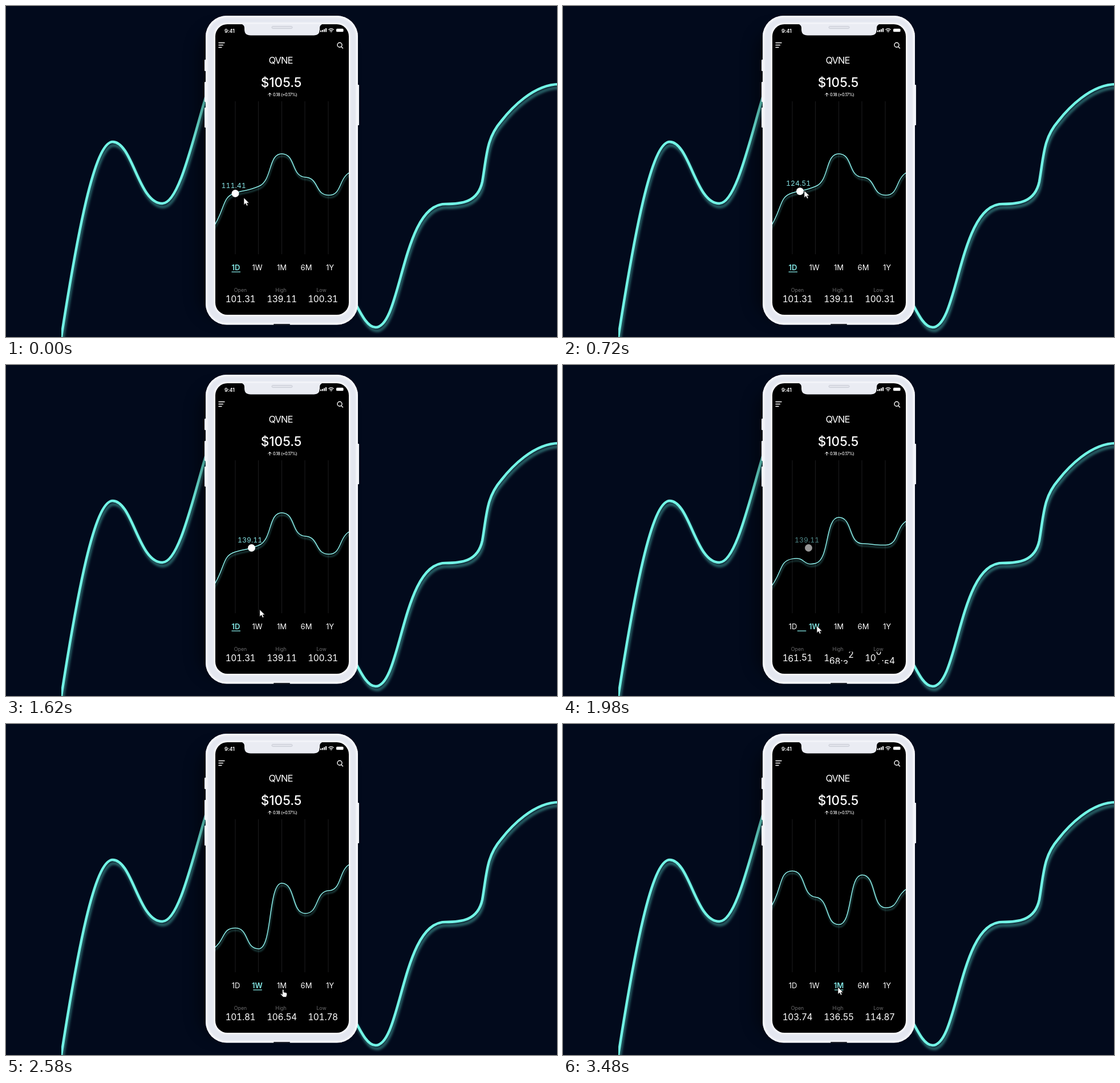
Write an HTML page that moves like this. It is 966x580 px and loops after 3540 ms.

```html
<!DOCTYPE html>
<html lang="en">
<head>
<meta charset="utf-8">
<title>Stock chart</title>
<style>
  html, body { margin: 0; width: 100%; height: 100%; overflow: hidden; background: #020a1c; }
  svg { display: block; width: 966px; height: 580px; font-family: Inter, "Liberation Sans", sans-serif; }
  .mid { text-anchor: middle; }
  .digits { font-feature-settings: "tnum"; }
  .line { fill: none; stroke-linecap: round; stroke-linejoin: round; }
</style>
</head>
<body>
<svg viewBox="0 0 966 580" fill="#fff">
  <defs>
    <filter id="glow" x="-10%" y="-10%" width="120%" height="130%">
      <feDropShadow dx="2" dy="6" stdDeviation="2.2" flood-color="#5fe0d4" flood-opacity=".5"/>
    </filter>
    <filter id="softGlow" x="-10%" y="-20%" width="120%" height="150%">
      <feDropShadow dx="1" dy="4" stdDeviation="1.5" flood-color="#5fd8d8" flood-opacity=".5"/>
    </filter>
    <filter id="blur" x="-30%" y="-20%" width="160%" height="140%"><feGaussianBlur stdDeviation="14"/></filter>
    <filter id="bevel"><feGaussianBlur stdDeviation="1"/></filter>
    <clipPath id="shell"><rect x="350" y="17" width="267" height="541.5" rx="37"/></clipPath>
    <clipPath id="screen"><rect x="367" y="32" width="234" height="509" rx="21"/></clipPath>
    <clipPath id="reels"><rect x="367" y="502.5" width="234" height="21"/></clipPath>
    <clipPath id="stage"><rect x="97" width="869" height="580"/></clipPath>
  </defs>

  <rect width="966" height="580" fill="#020a1c"/>
  <g clip-path="url(#stage)">
    <path class="line" filter="url(#glow)" stroke="#72f5e6" stroke-width="4.5" d="M96 586L97 580C125 400 155 238 187 238
      C222 238 232 346 274 346C302 346 325 245 350 160L380 60M600 490L612 520C625 545 635 563 648 563
      C693 563 694 347 770 347C797 347 827 345 835 308C843 262 842 232 868 202C885 180 925 137 970 137"/>
  </g>
  <rect x="340" y="42" width="254" height="504" rx="36" opacity=".5" fill="#000" filter="url(#blur)"/>

  <g fill="#eef0f5">
    <rect x="348" y="94" width="4" height="20" rx="1"/>
    <rect x="348" y="133" width="4" height="35" rx="1"/>
    <rect x="348" y="178" width="4" height="35" rx="1"/>
    <rect x="615" y="138" width="4" height="71" rx="1"/>
  </g>
  <g clip-path="url(#shell)">
    <rect x="350" y="17" width="267" height="541.5" fill="#e4e7f0"/>
    <g fill="none" stroke="#f6f7fb" filter="url(#bevel)">
      <rect x="350" y="17" width="267" height="541.5" rx="37" stroke-width="7"/>
      <rect x="367" y="32" width="234" height="509" rx="21" stroke-width="6"/>
    </g>
  </g>
  <rect x="469" y="557" width="29" height="2" rx="1" fill="#23262e"/>
  <rect x="367" y="32" width="234" height="509" rx="21" fill="#000"/>
  <path fill="#eaecf3" d="M411 31.5Q417.500 32 418 38V41Q418 51.500 429 51.500H540Q550 51.500 550 41V38Q550.500 32 557 31.500Z"/>
  <rect x="466" y="35.500" width="36" height="4" rx="2" fill="#e0e2ea" stroke="#c3c6d0" stroke-width=".8"/>

  <text x="383" y="47" font-size="9.2" font-weight="600" letter-spacing="-.2">9:41</text>
  <path d="M551 43h2v2.500h-2zM554 42h2v3.500h-2zM557 40.500h2v5h-2zM560 39h2v6.500h-2z"/>
  <path class="line" stroke="#fff" stroke-width="1.300" d="M566 41.300q4-3.400 8 0M567.800 43.300q2.200-1.800 4.400 0"/>
  <circle cx="570" cy="45" r="1"/>
  <rect x="579" y="39.800" width="12.500" height="5.500" rx="1.500"/>
  <path class="line" stroke="#fff" stroke-width="1.300" d="M373 64.500h10M373 68.500h7.500M373 72.500h5"/>
  <path class="line" stroke="#fff" stroke-width="1.400" d="M588 71.500l2.500 2.500M589 68.300a4 4 0 1 1-8 0a4 4 0 1 1 8 0"/>

  <text class="mid" x="481.500" y="101" font-size="16.500" letter-spacing="-.9">QVNE</text>
  <text class="mid" x="482.500" y="142" font-size="22.500" font-weight="500">$105.5</text>
  <path class="line" stroke="#fff" stroke-width="1" d="M462.500 158v-5.500m-2.800 2.700l2.800-2.700l2.800 2.700"/>
  <text x="468" y="158" font-size="7.200" font-weight="500" letter-spacing="-.25">0.18 (+0.17%)</text>

  <g clip-path="url(#screen)">
    <path d="M402 167V435M442.500 167V435M483.500 167V435M524 167V435M565 167V435" stroke="#1d1d1f"/>
    <path id="chart" class="line" filter="url(#softGlow)" stroke="#8df1ec" stroke-width="1.500"/>
  </g>
  <g id="marker">
    <circle r="6.500"/>
    <text id="price" class="digits" x="-24.500" y="-9.500" font-size="12.300" fill="#83dfe0"></text>
  </g>
  <g id="tabs" class="mid" font-size="13"></g>
  <rect id="underline" y="465.300" width="15.500" height="1.300" fill="#83e6e4"/>
  <g id="stats"></g>
  <g id="cursor" stroke="#111" stroke-width=".7">
    <path id="arrow" d="M0 0V12.500L3 9.800L5 14.200L7.200 13.200L5.300 9.200H9.200Z"/>
    <path id="hand" d="M2.600 12V5.400a1.200 1.200 0 0 1 2.400 0V9l1.900.3l2 .4l1.600.9v3.200L9.300 17.500H4L-.6 12.600q0-1.400 1.300-1L2.600 13Z"/>
  </g>
</svg>
<script>
const LOOP = 3540, SWITCHES = [1914, 2692], SWITCH_TIME = 270, ROW = 27;
const $ = id => document.getElementById(id);
const mix = (a, b, p) => a + (b - a) * p;
const clamp = p => Math.min(1, Math.max(0, p));
const smooth = p => p * p * (3 - 2 * p);
const between = (t, a, b) => smooth(clamp((t - a) / (b - a)));

// Same curve as the CSS "ease" keyword.
function ease(p) {
  const bezier = (u, a, b) => 3 * u * (1 - u) ** 2 * a + 3 * u * u * (1 - u) * b + u ** 3;
  let lo = 0, hi = 1;
  for (let i = 0; i < 20; i++) {
    const u = (lo + hi) / 2;
    if (bezier(u, .25, .25) < p) lo = u; else hi = u;
  }
  return bezier(lo, .1, 1);
}

function add(parent, tag, attrs, text = '') {
  const el = document.createElementNS('http://www.w3.org/2000/svg', tag);
  for (const key in attrs) el.setAttribute(key, attrs[key]);
  el.textContent = text;
  return parent.appendChild(el);
}

// Chart knots: [y, slope] for each range.
const knotX = [361, 402, 443, 483.5, 524.5, 566, 606];
const charts = [
  [[392, -1.5], [327.5, -.3], [316, -.4], [259, 0], [300, .05], [331.5, 0], [290, -.4]],
  [[396, -.7], [357.5, 0], [394, 0], [279, 0], [332, 0], [292, -.05], [244, -.4]],
  [[327, -1.5], [257.5, 0], [303.5, .1], [351.5, 0], [264.5, 0], [322, 0], [287, -.5]]
];

function chartPath(from, to, p) {
  const knots = from.map(([y, s], i) => [mix(y, to[i][0], p), mix(s, to[i][1], p)]);
  let d = `M${knotX[0]} ${knots[0][0]}`;
  for (let i = 1; i < knots.length; i++) {
    const [y0, s0] = knots[i - 1], [y1, s1] = knots[i];
    const h = (knotX[i] - knotX[i - 1]) * .6;
    d += `C${knotX[i - 1] + h} ${y0 + s0 * h} ${knotX[i] - h} ${y1 - s1 * h} ${knotX[i]} ${y1}`;
  }
  return d;
}

const tabs = [['1D', 403], ['1W', 440.5], ['1M', 483.5], ['6M', 526.5], ['1Y', 568]]
  .map(([name, x]) => add($('tabs'), 'text', { x, y: 463 }, name));
const underlineX = [395.5, 433.3, 476];

// Reel positions are hexadecimal: "a" is the zero after nine.
const reels = [];
[
  ['Open', 411, 385, ['1a131', '10181', '1a374']],
  ['High', 482, 457.5, ['13911', '1a654', '13655']],
  ['Low', 553, 529.5, ['1a031', '1a178', '11487']]
].forEach(([name, labelX, x, values]) => {
  add($('stats'), 'text', { class: 'mid', x: labelX, y: 501, 'font-size': 8.8, fill: '#6c6c6e' }, name);
  const row = add($('stats'), 'g', { class: 'mid digits', 'font-size': 15.5, 'clip-path': 'url(#reels)' });
  add(row, 'text', { x: x + 31, y: 519 }, '.');
  for (let col = 0; col < 5; col++) {
    const reel = add(row, 'g', {});
    const cx = x + 4.8 + 9.6 * col + (col > 2 ? 4.4 : 0);
    for (let n = 0; n <= 10; n++) add(reel, 'text', { x: cx, y: 519 + n * ROW }, n % 10);
    reels.push({ reel, stops: values.map(v => parseInt(v[col], 16)) });
  }
});

const cursorKeys = [[0, 417, 336], [330, 404, 330], [480, 404, 330], [980, 444, 316], [1180, 444, 316],
  [1800, 445, 457], [2180, 445, 457], [2520, 482, 461], [LOOP, 482, 461]];

function cursorAt(t) {
  const i = cursorKeys.findIndex(key => key[0] > t);
  const [t0, x0, y0] = cursorKeys[i - 1], [t1, x1, y1] = cursorKeys[i];
  const p = between(t, t0, t1);
  return [mix(x0, x1, p), mix(y0, y1, p)];
}

function draw(t) {
  const from = t < SWITCHES[1] ? 0 : 1, to = from + 1;
  const p = ease(clamp((t - SWITCHES[from]) / SWITCH_TIME));

  $('chart').setAttribute('d', chartPath(charts[from], charts[to], p));
  $('underline').setAttribute('x', mix(underlineX[from], underlineX[to], p));
  const active = t < SWITCHES[from] ? from : to;
  tabs.forEach((tab, i) => {
    tab.setAttribute('fill', i === active ? '#83e6e4' : '#fff');
    tab.setAttribute('font-weight', i === active ? 600 : 400);
  });
  for (const { reel, stops } of reels)
    reel.setAttribute('transform', `translate(0 ${-ROW * mix(stops[from], stops[to], p)})`);

  const drag = between(t, 480, 980);
  $('marker').setAttribute('transform', `translate(${mix(402, 430.5, drag)} ${mix(328.5, 320.5, drag)})`);
  $('marker').setAttribute('opacity', from ? 0 : 1 - p);
  $('price').textContent = mix(111.41, 139.11, drag).toFixed(2);

  const pointing = t > 1790 && t < SWITCHES[0] || t > 2480 && t < SWITCHES[1];
  $('cursor').setAttribute('transform', `translate(${cursorAt(t)})`);
  $('arrow').style.display = pointing ? 'none' : '';
  $('hand').style.display = pointing ? '' : 'none';
}

const start = performance.now();
function tick() {
  draw((performance.now() - start) % LOOP);
  requestAnimationFrame(tick);
}
tick();
</script>
</body>
</html>
```
